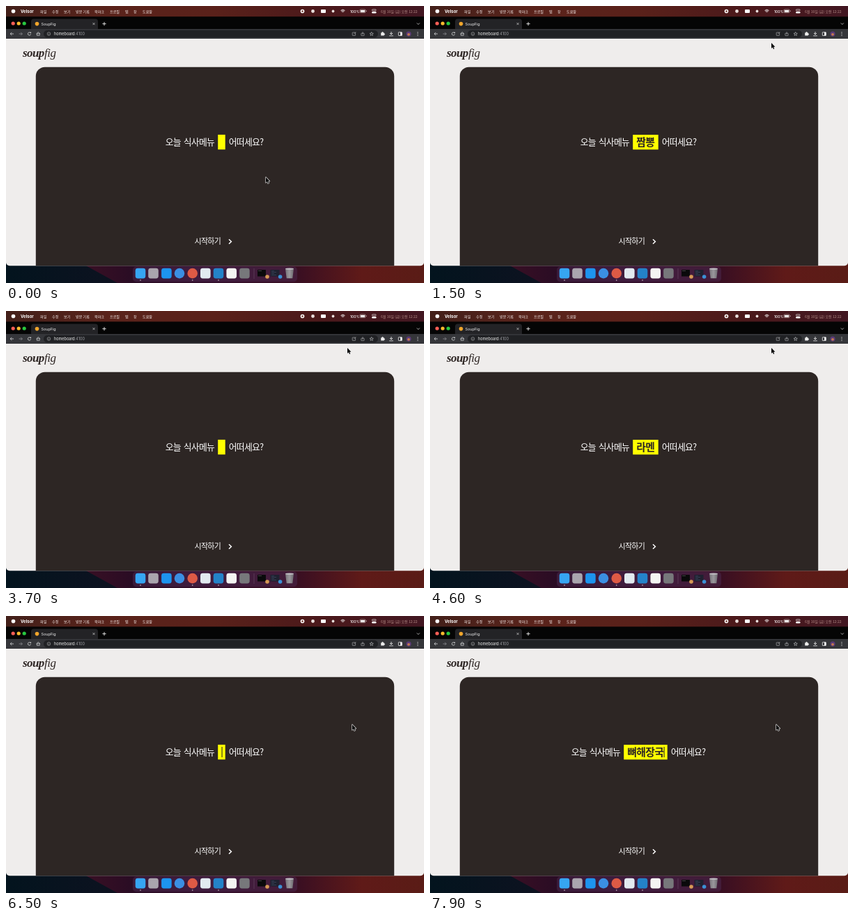
Animation of 600 by 398 pixels, one loop 8 s. Source, as an HTML page with a canvas:

```html
<!DOCTYPE html>
<html lang="ko">
<head>
<meta charset="utf-8">
<title>SoupFig</title>
<style>
  html, body { margin: 0; width: 100%; height: 100%; overflow: hidden; background: #000; }
  canvas { display: block; width: 600px; height: 398px; }
</style>
</head>
<body>
<canvas id="stage"></canvas>
<script>
const W = 600, H = 398, LOOP = 8000, STEP = 100;
const SANS = '"Noto Sans CJK KR", "Noto Sans CJK", "Noto Sans CJK JP", sans-serif';
const SERIF = '"Liberation Serif", "Noto Serif", serif';
const canvas = document.getElementById('stage');
const ratio = window.devicePixelRatio || 1;
canvas.width = W * ratio;
canvas.height = H * ratio;
const ctx = canvas.getContext('2d');
ctx.scale(ratio, ratio);

// [time, visible word]; the first entry sets the cursor's blink phase
const words = [
  [-500, ''], [600, '짬'], [800, '짬뽕'], [2800, '짬'], [2900, ''],
  [3800, '라'], [4000, '라멘'], [6000, '라'], [6200, ''],
  [7200, '뼈'], [7500, '뼈해'], [7700, '뼈해장'], [7900, '뼈해장국']
];
// [time, x, y] of the pointer tip
const pointer = [[0, 373, 246], [100, 373, 246], [500, 490, 53], [4600, 490, 53], [5200, 497, 156]];

function rect(x, y, w, h, fill, r = 0) {
  ctx.fillStyle = fill;
  ctx.beginPath();
  ctx.roundRect(x, y, w, h, r);
  ctx.fill();
}

function poly(fill, ...pts) {
  ctx.fillStyle = fill;
  ctx.beginPath();
  for (let i = 0; i < pts.length; i += 2) ctx.lineTo(pts[i], pts[i + 1]);
  ctx.closePath();
  ctx.fill();
}

function disc(x, y, r, fill) {
  ctx.fillStyle = fill;
  ctx.beginPath();
  ctx.arc(x, y, r, 0, Math.PI * 2);
  ctx.fill();
}

function ring(x, y, r, color, width, from = 0, to = Math.PI * 2) {
  ctx.strokeStyle = color;
  ctx.lineWidth = width;
  ctx.beginPath();
  ctx.arc(x, y, r, from, to);
  ctx.stroke();
}

function line(color, width, ...pts) {
  ctx.strokeStyle = color;
  ctx.lineWidth = width;
  ctx.beginPath();
  for (let i = 0; i < pts.length; i += 2) ctx.lineTo(pts[i], pts[i + 1]);
  ctx.stroke();
}

function frame(x, y, w, h, color, width, r = 0.5) {
  ctx.strokeStyle = color;
  ctx.lineWidth = width;
  ctx.beginPath();
  ctx.roundRect(x, y, w, h, r);
  ctx.stroke();
}

function text(str, x, y, font, fill, spacing = 0, wordGap = 0) {
  ctx.font = font;
  ctx.letterSpacing = spacing + 'px';
  ctx.wordSpacing = wordGap + 'px';
  ctx.fillStyle = fill;
  ctx.fillText(str, x, y);
}

function shade(x0, y0, x1, y1, ...stops) {
  const g = ctx.createLinearGradient(x0, y0, x1, y1);
  stops.forEach(([at, color]) => g.addColorStop(at, color));
  return g;
}

function drawMenuBar() {
  rect(0, 0, W, 15.5, shade(0, 0, W, 0,
    [0, '#43201a'], [0.25, '#5a231b'], [0.5, '#5a211a'], [0.75, '#4b191b'], [1, '#421722']));
  disc(10.5, 7.5, 2.8, '#fff');
  text('Velsor', 21, 9.6, 'bold 6px Inter, sans-serif', '#fff');
  const items = [['파일', 49], ['수정', 66], ['보기', 83], ['방문 기록', 100], ['북마크', 127],
    ['프로필', 149], ['탭', 171], ['창', 183], ['도움말', 196]];
  items.forEach(([label, x]) => text(label, x, 9.5, `500 5.1px ${SANS}`, '#f6eeec'));

  disc(425.5, 7.5, 2.8, '#fff');
  disc(425.5, 7.5, 1.2, '#6a2c22');
  disc(440.5, 7.5, 2.4, '#e9dedb');
  rect(452, 5, 7, 5, '#fff', 1);
  disc(469.5, 7.5, 1.9, '#e9dedb');
  for (const r of [1.4, 2.9, 4.4]) ring(483.5, 9.8, r, '#fff', 0.9, -2.3, -0.84);
  text('100%', 494, 9.5, '500 5px Inter, sans-serif', '#fff');
  frame(508, 5, 8, 4.6, '#ddd0cd', 0.6, 1.2);
  rect(508.9, 5.9, 6.2, 2.8, '#fff', 0.6);
  rect(516.8, 6.5, 0.7, 1.6, '#ddd0cd');
  frame(525.4, 4.9, 5.8, 1.9, '#fff', 0.6, 1);
  rect(525.1, 7.9, 6.4, 2.6, '#fff', 1.3);
  text('6월 16일 (금) 오전 12:22', 538, 9.6, `5.1px ${SANS}`, '#b58e88');
}

function drawBrowser() {
  rect(0, 15.5, W, 18, '#050505');
  ['#fe5f57', '#febc2e', '#28c840'].forEach((c, i) => disc(10.2 + i * 8, 25, 2.6, c));
  rect(36, 18.5, 96, 15, '#232326', [4, 4, 0, 0]);
  rect(0, 33, W, 14, '#35363a');
  disc(44.5, 25.6, 2.8, '#f0a52c');
  text('SoupFig', 50.5, 27.6, '5.4px Inter, sans-serif', '#f1f1f1');
  line('#d8d8d8', 0.7, 124.5, 24.1, 127.5, 27.1);
  line('#d8d8d8', 0.7, 127.5, 24.1, 124.5, 27.1);
  line('#f0f0f0', 0.9, 138.4, 25.6, 143.6, 25.6);
  line('#f0f0f0', 0.9, 141, 23, 141, 28.2);
  line('#d8d8d8', 0.8, 589.8, 24.5, 591.8, 26.5, 593.8, 24.5);

  const ink = '#d6d7d9';
  line(ink, 0.8, 11, 40, 6.2, 40);
  line(ink, 0.8, 8.3, 37.9, 6.2, 40, 8.3, 42.1);
  line('#8d8e92', 0.8, 18.6, 40, 23.4, 40);
  line('#8d8e92', 0.8, 21.3, 37.9, 23.4, 40, 21.3, 42.1);
  ring(33.5, 40, 2.1, ink, 0.8, 0.2, 5.5);
  rect(34.6, 37.6, 1.5, 1.5, ink);
  line(ink, 0.8, 43.5, 40, 46.3, 37.6, 49.1, 40);
  frame(44.4, 39.8, 3.8, 2.5, ink, 0.7, 0);

  rect(54, 34.8, 480, 10.5, '#202124', 5.25);
  ring(61.5, 40, 2.3, '#b9babd', 0.6);
  line('#b9babd', 0.6, 61.5, 39.5, 61.5, 41.3);
  text('homeboard', 69, 41.9, '5.5px Inter, sans-serif', '#f3f3f3');
  text(':4100', 69 + ctx.measureText('homeboard').width, 41.9, '5.5px Inter, sans-serif', '#9a9ba0');

  frame(497.2, 38, 4.4, 4.4, '#b9babd', 0.6);
  line('#b9babd', 0.6, 499.3, 40.3, 502.3, 37.3);
  frame(509.8, 39.2, 4.4, 3.4, '#b9babd', 0.6);
  line('#b9babd', 0.6, 512, 41, 512, 37);
  ctx.strokeStyle = '#c8c9cc';
  ctx.lineWidth = 0.6;
  ctx.beginPath();
  for (let i = 0; i < 10; i++) {
    const a = i * Math.PI / 5 - Math.PI / 2, r = i % 2 ? 1.2 : 2.8;
    ctx.lineTo(524.7 + r * Math.cos(a), 40.2 + r * Math.sin(a));
  }
  ctx.closePath();
  ctx.stroke();

  rect(538.2, 38.2, 4.6, 4.4, '#eee', 0.6);
  disc(540.5, 38, 1, '#eee');
  disc(543, 40.4, 1, '#eee');
  line('#eee', 0.9, 553, 37, 553, 40.8);
  line('#eee', 0.9, 551, 39, 553, 41, 555, 39);
  line('#eee', 0.8, 550.2, 42.8, 555.8, 42.8);
  frame(563.3, 37.7, 5, 4.8, '#eee', 0.8);
  rect(566, 37.7, 2.4, 4.8, '#eee');
  disc(578, 40.1, 3.6, '#5a3a78');
  disc(578, 40.8, 1.9, '#c47a4e');
  for (const y of [37.9, 40.1, 42.3]) disc(591, y, 0.6, '#eee');
}

function drawPage() {
  rect(0, 47, W, 326.2, '#efedec', [0, 0, 5, 5]);
  const logo = '#2d2523';
  text('soup', 24, 72.6, `italic bold 17px ${SERIF}`, logo, -0.6);
  text('fig', 55, 72.6, `italic 17px ${SERIF}`, logo, -0.5);
  rect(42.8, 87.8, 514.4, 285.4, '#2d2624', [13, 13, 0, 0]);
  text('시작하기', 270.6, 342.2, `11px ${SANS}`, '#fff', -0.75);
  line('#fff', 1.5, 320, 335.2, 323.4, 338.5, 320, 341.8);
}

function drawWallpaper() {
  const top = 366;
  rect(0, top, W, H - top, shade(0, 0, W, 0,
    [0.18, '#3a1024'], [0.3, '#2a0c24'], [0.5, '#340f2c'],
    [0.7, '#3a0f22'], [0.85, '#5f1a18'], [1, '#5a1c16']));
  poly(shade(0, 0, 160, 0, [0, '#03141e'], [1, '#0d1220']), 0, top, 102, top, 160, H, 0, H);
}

function drawDock() {
  rect(182, 374.6, 236, 21.6, 'rgba(78,46,84,.45)', 5);

  const tile = (x, fill) => rect(x - 7.3, 376.8, 14.6, 14.6, fill, 3.4);
  const tiles = [[193, '#36a5f2'], [211.5, '#aaa5ae'], [230.4, '#1d94ee'], [286.3, '#e2eaf0'],
    [305, '#2483c9'], [323.7, '#f4f4f2'], [342.4, '#77787b']];
  tiles.forEach(([x, fill]) => tile(x, fill));
  disc(249, 384.1, 7.3, '#3b8fe2');
  disc(267.7, 384.1, 7.3, '#dd5a45');
  for (const x of [193, 267.7, 305]) disc(x, 394, 0.8, '#d5c9d2');

  rect(355.7, 377, 0.6, 15, 'rgba(255,255,255,.22)');
  rect(361, 379, 12, 9.5, '#0a0a0b', 0.6);
  rect(362, 380.2, 5, 0.6, '#666');
  disc(375, 389, 2.8, '#d69a55');
  rect(379.5, 379, 13, 9.5, '#1f2130', 0.6);
  for (let i = 0; i < 4; i++) rect(381, 380.6 + i * 1.8, 4 + i % 2 * 3, 0.6, '#41506a');
  disc(393.6, 389, 2.8, '#3b91d6');

  poly(shade(401, 0, 413, 0, [0, '#77747a'], [0.5, '#9b989d'], [1, '#6c696f']),
    401, 377.5, 413, 377.5, 411.3, 391.3, 402.7, 391.3);
  ctx.fillStyle = '#c0bdc2';
  ctx.beginPath();
  ctx.ellipse(407, 377.6, 6.1, 1.2, 0, 0, Math.PI * 2);
  ctx.fill();
}

function drawPrompt(t) {
  const [since, word] = words.findLast(([at]) => at <= t);
  const wordW = 13 * word.length;
  const boxW = 10.5 + wordW;
  const left = 300.2 - (132.5 + boxW) / 2;
  const box = left + 75.5;
  const font = `12.8px ${SANS}`;
  text('오늘 식사메뉴', left, 200.3, font, '#fff', -0.68, 1.7);
  rect(box, 184.9, boxW, 21.3, '#ffff00');
  text(word, box + 5, 201, `bold 14.8px ${SANS}`, '#2d2523', -0.6);
  text('어떠세요?', box + boxW + 5, 200.3, font, '#fff', -0.68);
  if ((t - since) % 1000 < 500) rect(box + 5.3 + wordW, 188, 1.1, 15, '#2d2523');
}

function drawPointer(t) {
  const i = pointer.findLastIndex(([at]) => at <= t);
  const [t0, x0, y0] = pointer[i];
  const [t1, x1, y1] = pointer[i + 1] || [LOOP, x0, y0];
  const p = (t - t0) / (t1 - t0);
  const k = p * p * (3 - 2 * p);
  ctx.save();
  ctx.translate(x0 + (x1 - x0) * k, y0 + (y1 - y0) * k);
  ctx.scale(0.94, 0.94);
  ctx.beginPath();
  for (const [x, y] of [[0, 0], [0, 8.4], [1.9, 6.7], [3.2, 9.6], [4.5, 9], [3.3, 6.2], [5.8, 6]]) ctx.lineTo(x, y);
  ctx.closePath();
  ctx.lineJoin = 'round';
  ctx.strokeStyle = '#f2f2f2';
  ctx.lineWidth = 1.3;
  ctx.stroke();
  ctx.fillStyle = '#050505';
  ctx.fill();
  ctx.restore();
}

function render(now) {
  const t = Math.floor((now % LOOP) / STEP) * STEP;
  drawMenuBar();
  drawWallpaper();
  drawPage();
  drawBrowser();
  drawDock();
  drawPrompt(t);
  drawPointer(t);
  requestAnimationFrame(render);
}

requestAnimationFrame(render);
</script>
</body>
</html>
```
